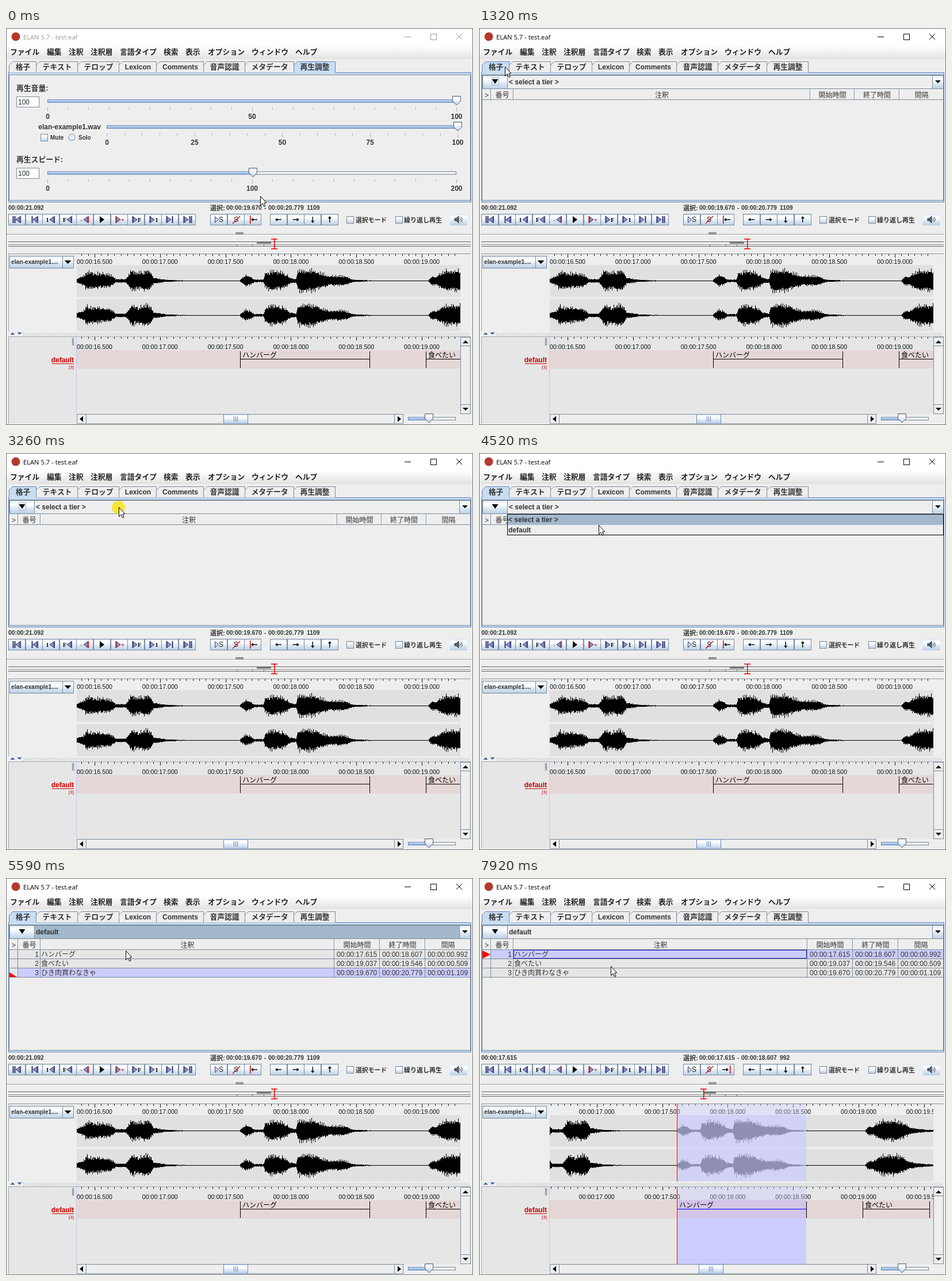
An HTML page with a canvas that plays this animation: 812x690 px, repeating every 8 s.

```html
<!DOCTYPE html>
<html lang="ja">
<head>
<meta charset="utf-8">
<style>
html, body { margin: 0; width: 100%; height: 100%; overflow: hidden; background: #eee; }
canvas { display: block; }
</style>
</head>
<body>
<canvas id="stage" width="812" height="690"></canvas>
<script>
const g = document.getElementById('stage').getContext('2d');
const SANS = '"Liberation Sans", "Noto Sans CJK JP", "Noto Sans CJK", sans-serif';
const EDGE = '#7a8a99', BLUE = '#6382bf', PANEL = '#eee', DARK = '#333', SEL = '#ccccff';
const PX_PER_SEC = 227.6;

// ---- drawing helpers ----
function rect(x, y, w, h, c) { g.fillStyle = c; g.fillRect(x, y, w, h); }

function box(x, y, w, h, fill, edge = EDGE) {
  rect(x, y, w, h, edge);
  rect(x + 1, y + 1, w - 2, h - 2, fill);
}

function poly(pts, fill, edge) {
  g.beginPath();
  for (let i = 0; i < pts.length; i += 2) g.lineTo(pts[i], pts[i + 1]);
  g.closePath();
  if (fill) { g.fillStyle = fill; g.fill(); }
  if (edge) { g.strokeStyle = edge; g.lineWidth = 1; g.stroke(); }
}

function line(x1, y1, x2, y2, c, w = 1) {
  g.strokeStyle = c;
  g.lineWidth = w;
  g.beginPath(); g.moveTo(x1, y1); g.lineTo(x2, y2); g.stroke();
}

function disc(x, y, r, c) {
  g.fillStyle = c;
  g.beginPath(); g.arc(x, y, r, 0, 7); g.fill();
}

function text(s, x, y, size = 12, bold = true, c = DARK, align = 'left', family = SANS) {
  g.font = (bold ? 'bold ' : '') + size + 'px ' + family;
  g.fillStyle = c;
  g.textAlign = align;
  g.fillText(s, x, y);
}

const plain = (s, x, y, align) => text(s, x, y, 12, false, DARK, align);

function gloss(y, h) {
  const f = g.createLinearGradient(0, y, 0, y + h);
  [[0, '#dde8f3'], [.3, '#fff'], [.6, '#dde8f3'], [1, '#b8cfe5']].forEach(s => f.addColorStop(...s));
  return f;
}

const button = (x, y, w, h) => box(x, y, w, h, gloss(y, h));

// triangle pointing sideways (dx) or vertically (dy) from its base centre
function arrowhead(x, y, dx, dy, half, c = '#000') {
  if (dx) poly([x, y - half, x + dx, y, x, y + half], c);
  else poly([x - half, y, x, y + dy, x + half, y], c);
}

function clipped(x, y, w, h, draw) {
  g.save();
  g.beginPath(); g.rect(x, y, w, h); g.clip();
  draw();
  g.restore();
}

// ---- window frame, menu and tabs ----
function frame(active) {
  rect(0, 0, 812, 690, PANEL);
  rect(1, 1, 810, 30, '#fff');
  const f = g.createLinearGradient(0, 31, 0, 54);
  f.addColorStop(0, '#fff'); f.addColorStop(1, '#e2e2e2');
  rect(1, 31, 810, 23, f);
  const c = active ? '#000' : '#999';
  disc(17, 15, 7.5, '#b5382c');
  text('ELAN 5.7 - test.eaf', 30, 20, 11.2, false, c, 'left', '"Open Sans", "Noto Sans", sans-serif');
  rect(693, 15, 11, 1, c);
  box(738, 10, 11, 11, '#fff', c);
  line(783, 10, 793, 20, c);
  line(793, 10, 783, 20, c);
  [['ファイル', 7], ['編集', 71], ['注釈', 109], ['注釈層', 147], ['言語タイプ', 198], ['検索', 274],
   ['表示', 312], ['オプション', 351], ['ウィンドウ', 427], ['ヘルプ', 503]]
    .forEach(([s, x]) => text(s, x, 46, 12.8, true, '#222'));
}

function tabs(current) {
  box(4, 77, 805, 226, '#c8ddf2', BLUE);
  box(5, 81, 803, 219, PANEL, EDGE);
  const names = ['格子', 'テキスト', 'テロップ', 'Lexicon', 'Comments', '音声認識', 'メタデータ', '再生調整'];
  const xs = [6, 53, 125, 197, 262, 344, 416, 501, 573];
  names.forEach((s, i) => {
    const a = xs[i] - .5, b = xs[i + 1] - .5, on = i === current, foot = on ? 78.5 : 77.5;
    poly([a, foot, a, 64.5, a + 6, 58.5, b, 58.5, b, foot], on ? '#c8ddf2' : PANEL);
    g.strokeStyle = on ? BLUE : EDGE;
    g.beginPath();
    [[a, 77], [a, 64.5], [a + 6, 58.5], [b, 58.5], [b, 77]].forEach(p => g.lineTo(...p));
    g.stroke();
    text(s, (a + b) / 2 + .5, 72, /[A-Z]/.test(s) ? 12 : 12.8, true, DARK, 'center');
  });
}

// ---- playback settings tab ----
function knob(x, y) {
  poly([x - 7, y - 7.5, x + 7, y - 7.5, x + 7, y + 1, x, y + 8, x - 7, y + 1], gloss(y - 8, 16), '#4d5a68');
}

function slider(x1, x2, y, value, labels) {
  const x = x1 + (x2 - x1) * value;
  box(x1, y - 2, x2 - x1, 6, PANEL);
  box(x1, y - 2, x - x1, 6, '#a3bfe0', BLUE);
  rect(x1 + 1, y - 1, x - x1 - 2, 1, '#dbe7f5');
  knob(x + .5, y);
  if (!labels) return;
  const major = 20 / (labels.length - 1);
  for (let i = 0; i <= 20; i++)
    rect(Math.round(x1 + (x2 - x1) * i / 20), y + 12, 1, i % major ? 4 : 7, '#a5adb5');
  labels.forEach((s, i) => text(s, x1 + (x2 - x1) * i / (labels.length - 1) + .5, y + 32, 12, true, DARK, 'center'));
}

function field(y) {
  box(18, y, 40, 19, '#fff');
  plain('100', 21, y + 14);
}

const check = (x, y) => box(x, y, 13, 13, gloss(y, 13));

function settings() {
  text('再生音量:', 18, 109, 12.8);
  field(119);
  slider(72, 783, 126, 1, ['0', '50', '100']);
  text('elan-example1.wav', 165, 176, 12, true, DARK, 'right');
  check(60, 184);
  text('Mute', 77, 194, 10);
  disc(114.5, 190, 6, EDGE);
  disc(114.5, 190, 5, '#e6eef7');
  text('Solo', 126, 194, 10);
  slider(175, 785, 171, 1, ['0', '25', '50', '75', '100']);
  text('再生スピード:', 18, 233, 12.8);
  field(243);
  slider(72, 783, 251, .502, ['0', '100', '200']);
}

// ---- grid tab ----
const ROWS = [
  ['ハンバーグ', '00:00:17.615', '00:00:18.607', '00:00:00.992'],
  ['食べたい', '00:00:19.037', '00:00:19.546', '00:00:00.509'],
  ['ひき肉買わなきゃ', '00:00:19.670', '00:00:20.779', '00:00:01.109']
];

function grid(t) {
  const filled = t >= 5590, moved = t >= 7220;
  button(6, 82, 44, 24);
  arrowhead(28, 89, 0, 8, 5.5);
  if (t < 3270) { g.strokeStyle = '#a3b8cc'; g.strokeRect(22.5, 86.5, 12, 13); }
  box(49, 82, 740, 24, filled && !moved ? '#a3b8cc' : PANEL);
  text(filled ? 'default' : '< select a tier >', 52, 98);
  button(788, 82, 20, 24);
  arrowhead(798, 91, 0, 5, 5);

  const xs = filled ? [6, 21, 60, 571, 650, 729, 808] : [6, 21, 60, 576, 653, 731, 808];
  ['>', '番号', '注釈', '開始時間', '終了時間', '間隔'].forEach((s, i) => {
    rect(xs[i], 106, 1, 18, '#fff');
    rect(xs[i + 1] - 1, 106, 1, 19, EDGE);
    plain(s, (xs[i] + xs[i + 1]) / 2, 121, 'center');
  });
  rect(6, 124, 802, 1, EDGE);

  if (filled) ROWS.forEach((row, i) => {
    const y = 125 + 16 * i, on = i === (moved ? 0 : 2);
    rect(6, y, 802, 15, on ? SEL : '#e6e6e6');
    if (on) rect(6, y, 14, 15, '#e6e6e6');
    rect(6, y + 15, 802, 1, EDGE);
    xs.slice(1).forEach(x => rect(x - 1, y, 1, 16, EDGE));
    plain(String(i + 1), 57, y + 12, 'right');
    row.forEach((s, k) => plain(s, k ? xs[k + 2] + 4 : 61, y + 12));
    if (on && moved) {
      g.strokeStyle = '#1c1cb4';
      g.strokeRect(60.5, y + .5, 509, 14);
    }
  });
  if (filled && !moved) poly([6, 164, 19, 172, 6, 172], '#f00');
  if (moved) poly([6, 126, 20, 133, 6, 140], '#f00');

  if (t >= 3270 && !filled) {
    const low = t >= 4590 ? 18 : 0;
    box(49, 106, 759, 37, PANEL, '#000');
    rect(50, 107 + low, 757, low ? 17 : 18, '#a3b8cc');
    text('< select a tier >', 51, 120);
    text('default', 51, 138);
  }
  if (t >= 6300 && !moved) {
    box(207, 146, 68, 18, '#b8cfe5', BLUE);
    plain('ハンバーグ', 211, 160);
  }
}

// ---- media controls ----
function stepIcon(cx, dir, bars, label, mark) {
  const y = 333, tone = '#33336b';
  const bx = cx - dir * 6;
  arrowhead(bx + dir, y, dir * 7, 0, 5.5, '#8c94c8');
  poly([bx + dir, y - 5, bx + dir * 8, y, bx + dir, y + 5], null, tone);
  rect(bx - .5, y - 6, 1.5, 12, mark ? '#d00' : tone);
  for (let i = 0; i < bars; i++) rect(cx + dir * (4 + 3 * i) - .5, y - 6, 2, 12, tone);
  if (label) text(label, cx + dir * 6, y + 4, 11, true, mark ? '#d00' : '#111', 'center', '"Liberation Serif", serif');
}

function arrow(cx, cy, dx, dy) {
  line(cx - dx * 5, cy - dy * 5, cx + dx * 5, cy + dy * 5, '#000', 1.4);
  poly([cx + dx * 6, cy + dy * 6, cx + dx * 2 + dy * 3, cy + dy * 2 + dx * 3,
        cx + dx * 2 - dy * 3, cy + dy * 2 - dx * 3], '#000');
}

function controls(moved) {
  const size = 10.4, now = moved ? '00:00:17.615' : '00:00:21.092';
  text(now, 4, 316, size);
  text('選択:', 355, 317, 11);
  text(moved ? '00:00:17.615' : '00:00:19.670', 383, 316, size);
  text('-', 449, 316, size);
  text(moved ? '00:00:18.607' : '00:00:20.779', 456, 316, size);
  text(moved ? '992' : '1109', 523, 316, size);

  const row = (x, n) => {
    for (let i = 0; i < n; i++) button(Math.round(x + 29.6 * i), 323, 30, 20);
  };
  row(4, 11); row(355, 3); row(459, 4);
  [[-1, 2], [-1, 1], [-1, 0, '1'], [-1, 0, 'F'], [-1, 0, '-', 1], null,
   [1, 0, '+', 1], [1, 0, 'F'], [1, 0, '1'], [1, 1], [1, 2]].forEach((a, i) => {
    const cx = Math.round(19 + 29.6 * i);
    if (a) stepIcon(cx, ...a); else arrowhead(cx - 4, 333, 8, 0, 6);
  });
  poly([363.5, 328, 369.5, 333, 363.5, 338], '#dde8f3', '#33336b');
  text('S', 374, 337, 12, false, '#222', 'center');
  text('S', 400, 337, 12, false, '#222', 'center');
  line(394, 340, 407, 327, '#d00', 1.3);
  arrow(moved ? 428 : 432, 333, moved ? 1 : -1, 0);
  rect(moved ? 436 : 424, 326, 1.5, 14, '#d00');
  [[-1, 0], [1, 0], [0, 1], [0, -1]].forEach((d, i) => arrow(474 + 29.6 * i, 333, ...d));

  check(592, 327);
  text('選択モード', 608, 338, 10.8);
  check(677, 327);
  text('繰り返し再生', 692, 338, 11);
  rect(772, 323, 30, 20, gloss(323, 20));
  poly([780, 331, 783, 331, 787, 327, 787, 339, 783, 335, 780, 335], '#56677d', DARK);
  [3, 6].forEach(r => { g.strokeStyle = DARK; g.beginPath(); g.arc(787, 333, r, -.9, .9); g.stroke(); });
}

// ---- timeline ----
// envelope of the sound: x, half height
const ENV = [123, 4, 131, 8, 136, 10, 139, 18, 152, 16, 168, 14, 180, 12, 187, 7, 191, 3, 208, 3, 213, 12,
  219, 22, 224, 17, 232, 17, 246, 21, 251, 17, 256, 6, 270, 3, 282, 1, 300, .6, 330, .4, 406, .4, 411, 6,
  417, 11, 425, 7, 432, 2, 447, 2, 451, 15, 462, 20, 478, 17, 487, 12, 494, 5, 504, 3, 507, 19, 514, 22,
  538, 20, 548, 14, 562, 9, 580, 10, 592, 8, 600, 3, 612, 1, 640, .4, 734, .4, 739, 8, 748, 8, 755, 14,
  764, 20, 788, 20, 803, 13, 810, 7, 824, 4, 840, 2, 860, 1];

function level(x) {
  let i = 0;
  while (i < ENV.length - 4 && ENV[i + 2] < x) i += 2;
  const k = (x - ENV[i]) / (ENV[i + 2] - ENV[i]);
  return ENV[i + 1] + (ENV[i + 3] - ENV[i + 1]) * k;
}

function noise(n) {
  const v = Math.sin(n * 127.1) * 43758.5453;
  return v - Math.floor(v);
}

function wave(cy, seed, shift) {
  rect(123, cy, 667, 1, '#000');
  for (let x = 123; x < 790; x++) {
    const u = x + shift, a = level(u), dip = u % 3 ? .78 : 1;
    const up = Math.round(a * dip * (.7 + .4 * noise(u + seed)));
    const down = Math.round(a * dip * (.66 + .36 * noise(u * 1.7 + seed)));
    rect(x, cy - up, 1, up + down + 1, '#000');
  }
}

function ruler(y, shift, baseline) {
  clipped(123, y, 667, 24, () => {
    for (let i = -2; i < 70; i++) {
      const x = Math.round(154 - shift + i * PX_PER_SEC / 20);
      rect(x, y, 1, i % 10 ? 3 : 6, '#111');
    }
    for (let i = 0; i < 8; i++)
      text('00:00:' + (16.5 + i / 2).toFixed(3), 154 - shift + i * PX_PER_SEC / 2, baseline, 10.6, false, '#111', 'center');
  });
}

function overview(moved) {
  rect(1, 358, 808, 1, '#999');
  rect(1, 359, 808, 1, '#fff');
  rect(399, 355, 14, 1, '#555');
  rect(399, 357, 14, 1, '#555');
  [[371, '#666'], [376, '#888'], [379, '#666']].forEach(([y, c]) => rect(4, y, 804, 1, c));
  rect(moved ? 391 : 436, 372, moved ? 21 : 25, 3, '#808080');
  [401, 428, 448].forEach(x => rect(x, 376, 1, 4, '#666'));
  const x = moved ? 390 : 466;
  rect(x, 366, 1.5, 18, '#e00');
  rect(x - 5, 366, 11, 1.5, '#e00');
  rect(x - 5, 383, 11, 1.5, '#e00');
}

function timeline(moved) {
  const shift = moved ? 63 : 0;
  overview(moved);

  // waveform viewer
  rect(4, 392, 804, 1, '#8a929a');
  rect(4, 392, 1, 135, '#a0a8b0');
  box(6, 396, 112, 22, gloss(396, 22));
  rect(98, 396, 1, 22, EDGE);
  text('elan-example1....', 9, 410, 10.2);
  arrowhead(107.5, 404, 0, 6, 6);
  rect(123, 412, 667, 55, '#e0e0e0');
  rect(123, 471, 667, 56, '#e0e0e0');
  ruler(393, shift, 409.5);
  wave(439, 1, shift);
  wave(499, 9, shift);

  // divider
  rect(1, 527, 808, 10, PANEL);
  for (let x = 30; x < 806; x += 4) {
    rect(x, 530, 1, 1, '#8c98a8');
    rect(x + 2, 532, 1, 1, '#8c98a8');
    rect(x, 534, 1, 1, '#8c98a8');
  }
  arrowhead(11.5, 533, 0, -4, 4, '#3d5f9c');
  arrowhead(23.5, 529, 0, 4, 4, '#3d5f9c');
  rect(4, 536, 804, 1, '#a0a8b0');

  // annotation tier
  rect(4, 537, 118, 151, '#e6e6e6');
  rect(4, 536, 1, 152, '#a0a8b0');
  rect(123, 537, 667, 134, '#e6e6e6');
  rect(122, 537, 1, 134, '#c4c8e4');
  rect(115, 539, 1, 13, '#6a7490');
  rect(117, 539, 1, 13, '#6a7490');
  ruler(537, shift, 557.5);
  if (moved) rect(344, 559, 225, 112, SEL);
  rect(123, 560, 667, 32, 'rgba(224,180,180,.3)');
  text('default', 118, 581, 12, true, '#d00000', 'right');
  rect(80, 583, 38, 1, '#d00000');
  text('[3]', 118, 592, 8, false, '#d00000', 'right');
  clipped(123, 560, 667, 32, () => {
    [['ハンバーグ', 407, 632], ['食べたい', 730, 846]].forEach(([s, a, b], i) => {
      a -= shift; b -= shift;
      rect(a, 562, 1, 29, '#000');
      rect(b, 562, 1, 29, '#000');
      rect(a, 575, b - a, 1, moved && !i ? '#00f' : '#000');
      text(s, a + 4, 573, 12, false, '#000');
    });
  });
  if (moved) {
    rect(344, 393, 225, 19, 'rgba(204,204,255,.4)');
    rect(344, 412, 225, 115, 'rgba(204,204,255,.7)');
    rect(344, 537, 225, 22, 'rgba(204,204,255,.4)');
    rect(344, 393, 1, 134, '#f00');
    rect(344, 537, 1, 134, '#f00');
  }

  // scroll bars and zoom
  box(790, 537, 18, 134, PANEL);
  box(790, 537, 18, 16, PANEL);
  box(790, 654, 18, 17, PANEL);
  arrowhead(799, 548, 0, -5, 5);
  arrowhead(799, 660, 0, 5, 5);
  box(123, 671, 568, 17, PANEL);
  box(123, 671, 17, 17, PANEL);
  box(675, 671, 16, 17, PANEL);
  arrowhead(134, 679.5, -6, 0, 5);
  arrowhead(681, 679.5, 6, 0, 5);
  const x = moved ? 382 : 378;
  box(x, 671, 43, 17, gloss(671, 17), BLUE);
  [18, 21, 24].forEach(d => rect(x + d, 675, 1, 9, BLUE));
  slider(699, 782, 678, .434);
}

// ---- pointer ----
// start, end, steps, from x/y, to x/y
const MOVES = [
  [80, 860, 11, 441, 292, 44, 67],
  [1870, 2560, 10, 44, 67, 195, 94],
  [4040, 4590, 8, 195, 94, 207, 126],
  [6610, 6670, 2, 207, 126, 216, 129],
  [7770, 7920, 3, 216, 129, 228, 153]
];
const CLICKS = [[1240, 1320], [3190, 3340], [5440, 5590], [7130, 7220]];

function pointer(t) {
  let x = 441, y = 292;
  for (const [a, b, n, x0, y0, x1, y1] of MOVES) {
    if (t < a) break;
    const k = Math.min(n, Math.floor((t - a) / (b - a) * (n - 1) + .1) + 1);
    const e = 1 - (1 - k / n) ** 1.65;
    x = Math.round(x0 + (x1 - x0) * e);
    y = Math.round(y0 + (y1 - y0) * e);
  }
  if (CLICKS.some(([a, b]) => t >= a && t < b)) disc(x + .5, y + .5, 11.5, 'rgba(250,225,0,.75)');
  const shape = [1, 0, 1, 16, 4.8, 12.5, 7.2, 18, 9.6, 17, 7.2, 11.6, 11.2, 11.2];
  poly(shape.map((v, i) => v + .5 + (i % 2 ? y : x)), '#fff', '#000');
}

function draw(ms) {
  const t = ms % 8000, moved = t >= 7220, gridOn = t >= 1320;
  frame(t >= 1240);
  tabs(gridOn ? 0 : 7);
  if (gridOn) grid(t); else settings();
  controls(moved);
  timeline(moved);
  g.strokeStyle = '#70757a';
  g.lineWidth = 1;
  g.strokeRect(.5, .5, 811, 689);
  pointer(t);
}

const start = performance.now();
function tick() {
  draw(performance.now() - start);
  requestAnimationFrame(tick);
}
tick();
</script>
</body>
</html>
```
